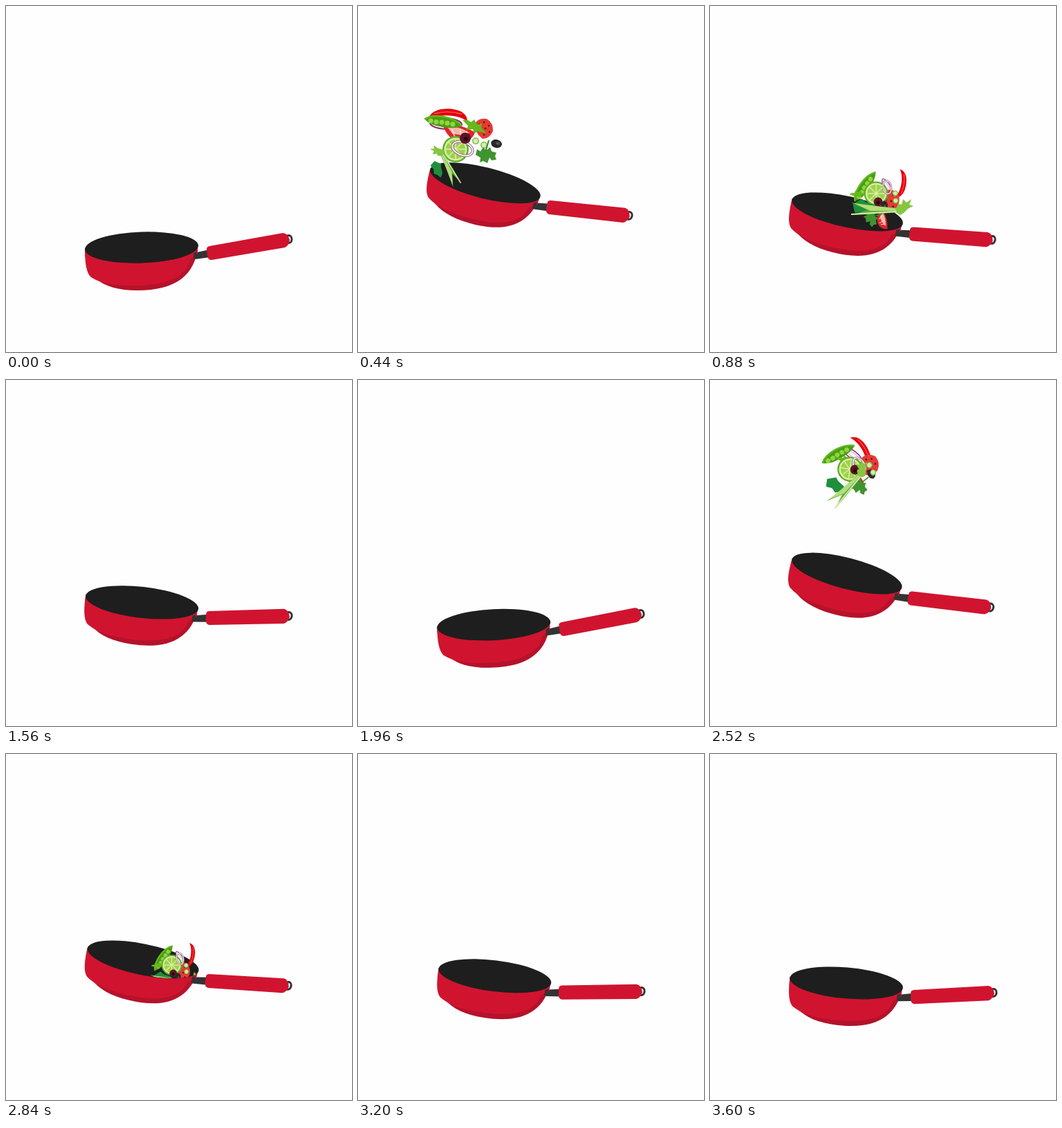
Animation, 500 px wide and 500 px high, one loop 3680 ms. Source, as an HTML page:

```html
<!DOCTYPE html>
<html lang="en">
<head>
<meta charset="utf-8">
<title>Frying pan toss</title>
<style>
  html, body { margin: 0; width: 100%; height: 100%; overflow: hidden; background: #fefefe; }
  svg { display: block; width: 100vw; height: 100vh; }
</style>
</head>
<body>
<svg viewBox="0 0 500 500">
  <defs>
    <clipPath id="opening">
      <path id="mouth" d="M-300 -400V335L114 352C114 365 150 374 198 371C246 369 279 357 278 346L310 310L700 -400Z"/>
    </clipPath>
  </defs>

  <g id="back">
    <ellipse cx="408.5" cy="337" rx="4.5" ry="5.5" fill="none" stroke="#333" stroke-width="3"/>
    <path d="M271 357L294 352L295 363L273 366Z" fill="#333"/>
    <path d="M114 350C113 387 134 411 190 411C246 411 274 388 277 347Z" fill="#b5122b"/>
    <path d="M114 350C114 375 117 386 123 392C142 404 166 404 190 404C236 403 262 389 266 366L277 358V347Z" fill="#d0142f"/>
    <path d="M271 357L276 355L275 364L271 366Z" fill="#333"/>
    <path d="M294 347L400 328Q407 328 410 338Q409 346 403 349L297 367Q292 367 291 361L290 351Q290 348 294 347Z" fill="#d0142f"/>
    <ellipse cx="196" cy="349" rx="82" ry="22.5" fill="#1e1e1e" transform="rotate(-2 196 349)"/>
  </g>

  <g id="food" clip-path="url(#opening)">
    <g id="onion">
      <ellipse rx="23" ry="8" fill="#f8eef4" stroke="#8d2f6b" stroke-width="2"/>
      <ellipse rx="16" ry="4" fill="none" stroke="#c58ab4"/>
    </g>
    <g id="chili">
      <path d="M-28 8C-27 -8 -5 -12 10 -10C24 -8 29 0 28 6C20 -2 -10 -5 -28 8Z" fill="#e3000f"/>
      <path d="M-20 -2Q0 -9 20 -4" fill="none" stroke="#ff6a60" stroke-width="1.2"/>
    </g>
    <g id="tomato">
      <path d="M-24 -8Q0 -14 24 -4Q20 12 4 13Q-14 12 -24 -8Z" fill="#e0252b"/>
      <path d="M-17 -6Q0 -10 16 -2Q6 4 -8 3Z" fill="#f6b7a8"/>
      <path d="M-10 -4L-4 7M2 -6L5 9M12 -4L9 7" stroke="#fbe5dc" stroke-width="1.5"/>
    </g>
    <g id="melon">
      <path d="M-13 -7Q-8 -16 4 -14Q14 -8 13 4Q8 15 -2 15Q-14 6 -13 -7Z" fill="#e63a35"/>
      <path d="M-7 -6h.1M0 -9h.1M7 -4h.1M-5 2h.1M2 0h.1M8 5h.1M0 9h.1" stroke="#4a1a16" stroke-width="2.6" stroke-linecap="round"/>
    </g>
    <g id="pod">
      <path d="M-27 -3Q-18 -10 0 -8Q18 -6 27 4Q18 9 0 7Q-18 6 -27 -3Z" fill="#4a9c16"/>
      <path d="M-18 -1h.1M-10 0h.1M-2 0h.1M6 1h.1M14 2h.1" stroke="#8fd63c" stroke-width="7" stroke-linecap="round"/>
      <path d="M-27 -3Q-18 -10 0 -8Q18 -6 27 4" fill="none" stroke="#62b81e" stroke-width="2.5"/>
    </g>
    <path id="rocket" d="M-17 -9Q-9 -11 -5 -6L0 -10L4 -3L11 -4L10 2L18 10L6 7L0 10L-2 4L-11 5L-9 -1Z" fill="#66b81c"/>
    <g id="lime">
      <circle r="19" fill="#5fae2a"/>
      <circle r="16.5" fill="#d9efa4"/>
      <circle r="14" fill="#9fd14c"/>
      <path d="M-14 0H14M0 -14V14M-10 -10L10 10M-10 10L10 -10" stroke="#d9efa4" stroke-width="1.6"/>
    </g>
    <g id="ring">
      <ellipse rx="16" ry="10" fill="none" stroke="#8d4f84" stroke-width="4"/>
      <ellipse rx="16" ry="10" fill="none" stroke="#f7f0f5" stroke-width="2.2"/>
    </g>
    <g id="cherry"><circle r="8" fill="#5a1524"/><circle cx="1" cy="1" r="3" fill="#24090e"/></g>
    <g id="olive"><ellipse rx="8" ry="6" fill="#2b2729"/><ellipse cx="2" cy="-1" rx="3" ry="2" fill="#58504f"/></g>
    <g id="cuke"><circle cx="-6" cy="-3" r="5" fill="#7cc043"/><circle cx="-6" cy="-3" r="3.4" fill="#d6ecb0"/><circle cx="6" cy="3" r="5" fill="#7cc043"/><circle cx="6" cy="3" r="3.4" fill="#d6ecb0"/></g>
    <g id="parsley">
      <path d="M4 -18L0 -4L-4 12M0 -4L11 7M0 -4L-11 1" stroke="#3f8a2c" stroke-width="2" fill="none"/>
      <path d="M-15 3L-13 -5L-8 -2L-4 -8L0 -3L6 -8L8 -2L15 0L13 5L15 10L8 11L5 7L2 15L-4 12L-9 14L-8 7Z" fill="#3f9430"/>
    </g>
    <path id="leek" d="M-18 -3L-6 -12L0 -8L12 -5L18 3L10 6L4 11L-4 7L-14 9Z" fill="#1f8f3d"/>
    <g id="celery">
      <path d="M-44 -9L-14 -4L24 -1L26 5L-16 8L-45 9L-20 2Z" fill="#5fae35"/>
      <path d="M-40 -8L24 0L25 3L-16 3Z" fill="#b4dc7c"/>
      <path d="M-44 8L22 4" stroke="#d3edab" stroke-width="2"/>
      <path d="M20 0L25 -7L29 -6L31 -14L36 -9L43 -14L40 -6L46 -4L38 0L32 6L27 9L22 6Z" fill="#86c640"/>
    </g>
  </g>
</svg>
<script>
const LOOP = 3680, STEP = 40, LAST = 3600;
const $ = id => document.getElementById(id);

// time, grip x, grip y, tilt
const poses = [
  [0, 409, 337, 0], [140, 408, 336, 2], [260, 400, 328, 8.5], [350, 386, 309, 14],
  [440, 392, 303, 16], [560, 401, 318, 17], [700, 407, 333, 15.3], [880, 408, 338, 14.2],
  [1120, 409, 342, 10.5], [1260, 409, 342, 7.8], [1360, 409, 341.5, 8.2], [1520, 409, 341.5, 8.2],
  [1560, 409, 341, 8.5], [1800, 410, 339, -5.7], [1960, 409, 338, -1], [2080, 400, 331, 8.5],
  [2160, 387.5, 314, 14.5], [2240, 394.5, 310.5, 19], [2400, 403, 322, 18], [2640, 407, 333, 15],
  [2840, 408, 335, 13.5], [3200, 410, 343, 9.2], [3600, 410, 345, 7]
];

// launch x, y, turn, scale, then landing x, y, turn, scale
const items = {
  onion: [127, 170, 3, 1, 256, 261, 60, .55],
  chili: [130, 159, 4, 1, 276, 257, 102, .72],
  tomato: [145, 183, 8, 1, 249, 309, 70, .62],
  melon: [182, 177, 0, 1, 260, 281, 30, 1.05],
  pod: [123, 168, 3, 1, 224, 261, -62, .95],
  rocket: [168, 174, 0, 1, 213, 272, -30, .6],
  lime: [141, 207, 0, 1, 240, 271, 90, .92],
  ring: [151, 206, 20, .95, 256, 262, 80, .6],
  cherry: [155, 191, 0, 1, 243, 283, 60, .8],
  olive: [200, 199, 15, 1, 252, 288, 90, .8],
  cuke: [176, 198, 0, 1, 268, 276, 60, .8],
  parsley: [185, 212, 0, 1, 235, 305, 60, .8],
  leek: [115, 236, 60, .7, 224, 291, 5, 1],
  celery: [128, 230, 242, .74, 248, 293, 360, 1]
};

const tosses = [{ peak: 623, dx: 0 }, { peak: 2440, dx: 5 }];
const UP = -.183, DOWN = .257, SETTLE = .405, GONE = .57;
const drop = s => 2500 * s * s;
const clamp = v => Math.min(1, Math.max(0, v));
const mix = (a, b, k) => a + (b - a) * k;

// Hermite curve with flat tangents at turning points
function slope(i, c) {
  if (i < 1 || i > poses.length - 2) return 0;
  const rate = j => (poses[j + 1][c] - poses[j][c]) / (poses[j + 1][0] - poses[j][0]);
  const a = rate(i - 1), b = rate(i);
  return a * b > 0 ? 2 * a * b / (a + b) : 0;
}

function pose(t, c) {
  let i = 0;
  while (i < poses.length - 2 && poses[i + 1][0] <= t) i++;
  const p = poses[i], q = poses[i + 1], d = q[0] - p[0], u = (t - p[0]) / d;
  const k = u * u * (3 - 2 * u);
  return mix(p[c], q[c], k) + d * u * (1 - u) * (slope(i, c) * (1 - u) - slope(i + 1, c) * u);
}

function placeFood(s, dx) {
  const u = clamp((s - UP) / (DOWN - UP));
  const air = drop(Math.min(s, DOWN));
  const k = 1 - (1 - clamp((s - DOWN) / (SETTLE - DOWN))) ** 2;
  const sink = 34 * k + 60 * clamp((s - SETTLE) / (GONE - SETTLE));
  for (const id in items) {
    const [x0, y0, r0, z0, x1, y1, r1, z1] = items[id];
    const x = mix(mix(x0 + dx, x1, u), 238, .25 * k);
    const y = mix(y0 - drop(UP), y1 - drop(DOWN), u) + air + sink;
    const size = mix(z0, z1, u) * (1 - .15 * k);
    $(id).setAttribute("transform", `translate(${x} ${y}) rotate(${mix(r0, r1, u)}) scale(${size})`);
  }
}

function draw(now) {
  const t = Math.min(LAST, Math.floor(now % LOOP / STEP) * STEP);
  const move = `translate(${pose(t, 1) - 409} ${pose(t, 2) - 337}) rotate(${pose(t, 3)} 409 337)`;
  $("back").setAttribute("transform", move);
  $("mouth").setAttribute("transform", move);
  const toss = tosses.find(o => (t - o.peak) / 1000 > -.3 && (t - o.peak) / 1000 < GONE);
  $("food").style.display = toss ? "" : "none";
  if (toss) placeFood((t - toss.peak) / 1000, toss.dx);
}

const start = performance.now();
function tick() {
  draw(performance.now() - start);
  requestAnimationFrame(tick);
}
tick();
</script>
</body>
</html>
```
